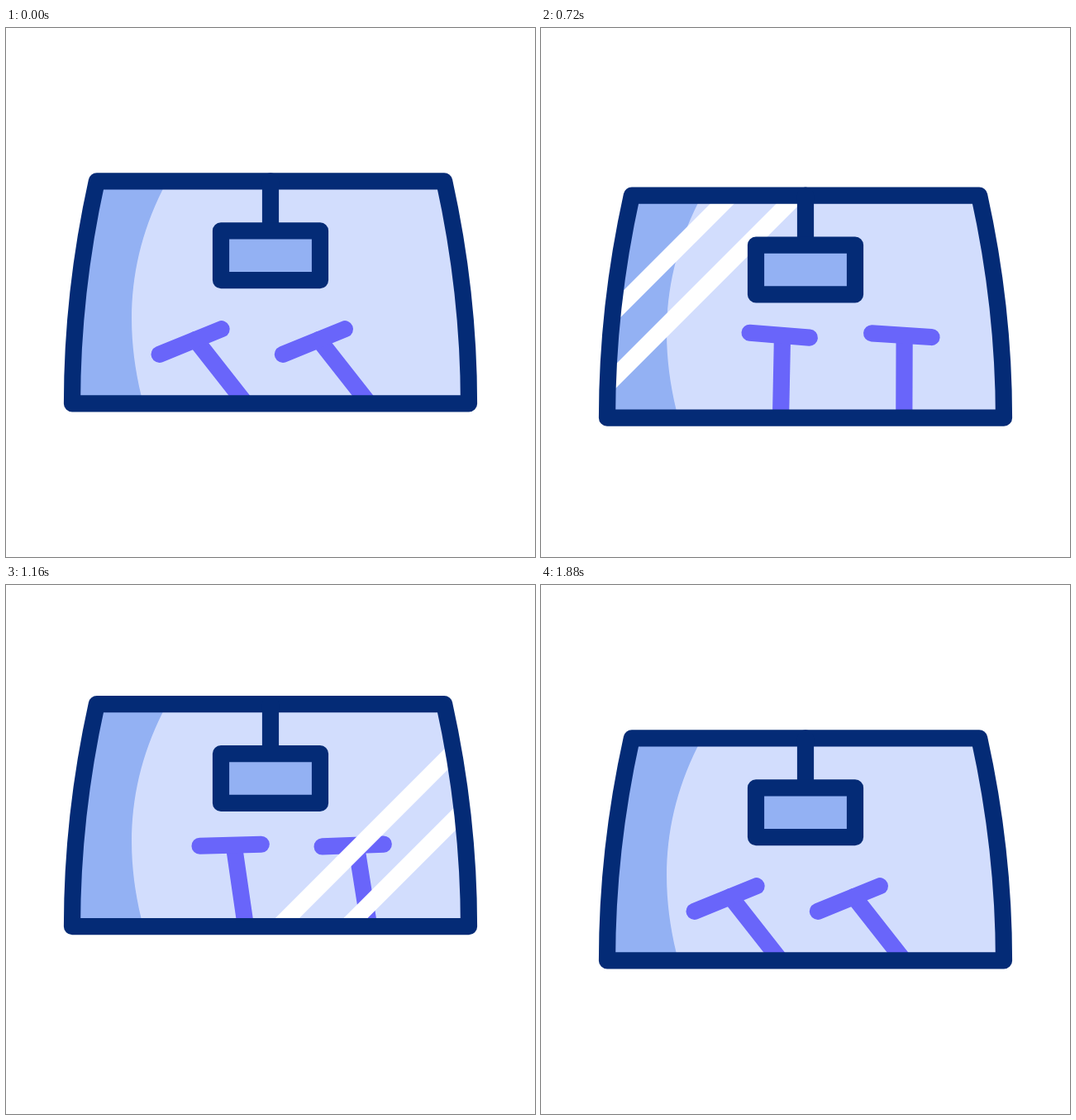
Animation of 640 by 640 pixels, one loop 2 s. Source, as an HTML page with a canvas:

```html
<!DOCTYPE html>
<html lang="en">
<head>
<meta charset="utf-8">
<title>Windshield wipers</title>
<style>
  html, body { margin: 0; width: 100%; height: 100%; overflow: hidden; background: #fff; }
  canvas { display: block; width: 640px; height: 640px; }
</style>
</head>
<body>
<canvas id="stage"></canvas>
<script>
const LOOP = 2000, STEP = 40;
const NAVY = '#042b76', GLASS = '#d2ddfd', SHADE = '#93b1f3', PURPLE = '#6965fa';
const TOP = 185.4, BASE = 454.4, LINE = 20.2;

const canvas = document.getElementById('stage');
const ctx = canvas.getContext('2d');
const dpr = window.devicePixelRatio || 1;
canvas.width = canvas.height = 640 * dpr;

const lerp = (a, b, p) => a + (b - a) * p;
const smooth = p => p * p * (3 - 2 * p);
const clamp = p => Math.min(1, Math.max(0, p));

// Eased value at time t from [time, value] keys.
function track(keys, t) {
  for (let i = 1; i < keys.length; i++) {
    const [t0, a] = keys[i - 1], [t1, b] = keys[i];
    if (t < t1) return lerp(a, b, smooth(clamp((t - t0) / (t1 - t0))));
  }
  return keys[keys.length - 1][1];
}

const BOUNCE = [[0, 0], [560, 28.3], [1200, -42], [1840, 0]];
const SWEEP = [[0, 0], [520, 1], [960, 0], [1400, 1], [1840, 0]];
const SHINE = [[0, 120], [1840, 1180]];

const glass = new Path2D(
  `M109.8 ${TOP}C90 275 80 365 80 ${BASE}H560C560 365 550 275 530.2 ${TOP}Z`);
const shade = new Path2D(
  `M60 ${TOP}H194.8L189.5 195.5C148 278.4 143.6 361.4 163.5 444.3L166 ${BASE}H60Z`);
const mirror = new Path2D('M260 245.3H380V305.1H260Z');

function line(color, x1, y1, x2, y2) {
  ctx.strokeStyle = color;
  ctx.beginPath();
  ctx.moveTo(x1, y1);
  ctx.lineTo(x2, y2);
  ctx.stroke();
}

function wiper(x, range, p) {
  const tip = -lerp(98.4, 100, p);
  ctx.save();
  ctx.translate(x, BASE);
  ctx.rotate((range * p - 38.2) * Math.PI / 180);
  line(PURPLE, 0, 0, 0, tip);
  // The blade tilts and shortens while the arm turns.
  line(PURPLE,
    lerp(-45.2, -35.2, p), tip + lerp(-13, 4.8, p),
    lerp(32.7, 33, p), tip + lerp(9.4, -4.5, p));
  ctx.restore();
}

// Diagonal band whose left edge is the line x + y = sum.
function band(sum) {
  ctx.fillStyle = '#fff';
  ctx.beginPath();
  ctx.moveTo(sum - TOP, TOP);
  ctx.lineTo(sum + 29 - TOP, TOP);
  ctx.lineTo(sum + 29 - BASE, BASE);
  ctx.lineTo(sum - BASE, BASE);
  ctx.fill();
}

function draw(t) {
  ctx.setTransform(dpr, 0, 0, dpr, 0, 0);
  ctx.fillStyle = '#fff';
  ctx.fillRect(0, 0, 640, 640);
  ctx.translate(0, track(BOUNCE, t));
  ctx.lineWidth = LINE;
  ctx.lineCap = ctx.lineJoin = 'round';

  ctx.save();
  ctx.clip(glass);
  ctx.fillStyle = GLASS;
  ctx.fill(glass);
  ctx.fillStyle = SHADE;
  ctx.fill(shade);
  const p = track(SWEEP, t);
  wiper(290, 69.3, p);
  wiper(439.3, 67.6, p);
  band(track(SHINE, t));
  band(track(SHINE, t - 100));
  ctx.restore();

  ctx.strokeStyle = NAVY;
  ctx.stroke(glass);
  line(NAVY, 320, TOP, 320, 245);
  ctx.fillStyle = SHADE;
  ctx.fill(mirror);
  ctx.stroke(mirror);
}

const start = performance.now();
function tick() {
  const t = (performance.now() - start) % LOOP;
  draw(Math.floor(t / STEP) * STEP);
  requestAnimationFrame(tick);
}
tick();
</script>
</body>
</html>
```
